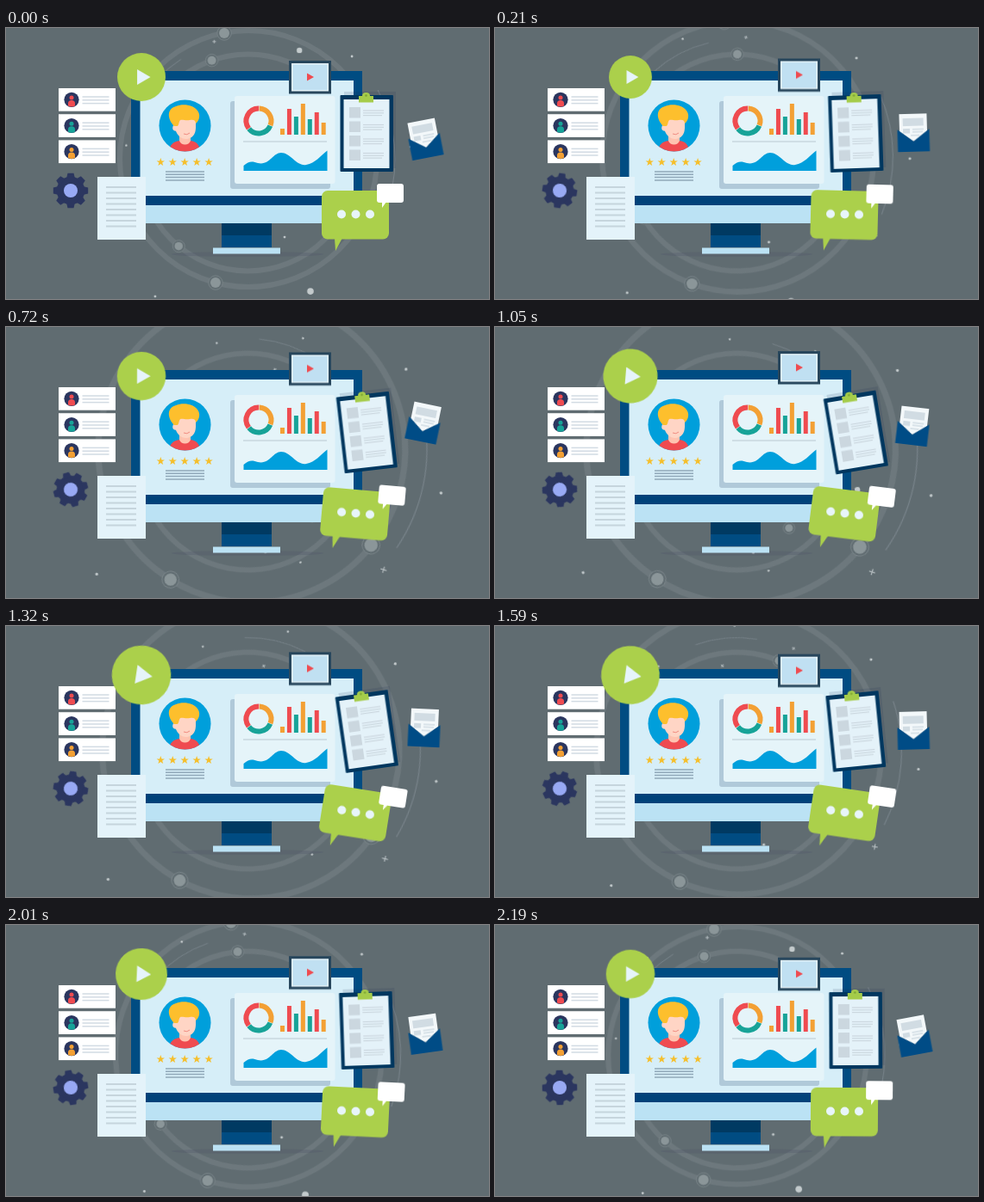
Recreate the animation shown at these times as an HTML page. Size 560x315 px, loop 2.22 s.

```html
<!DOCTYPE html>
<html lang="en">
<head>
<meta charset="utf-8">
<title>Dashboard</title>
<style>
html, body { margin: 0; width: 100%; height: 100%; overflow: hidden; background: #606c71; }
svg { display: block; width: 100vw; height: 100vh; }
</style>
</head>
<body>
<svg id="stage" viewBox="0 0 560 315">
  <g id="orbitOut"></g>
  <g id="orbitIn"></g>

  <ellipse cx="280" cy="263" rx="88" ry="3" fill="#4b5268" opacity=".25"/>

  <g id="monitor">
    <path fill="#004c82" d="M250 227h58v28h-58z"/>
    <path fill="#003a62" d="M250 227h58v14h-58z"/>
    <path fill="#bbe2f4" d="M240 255.500h78v7h-78z"/>
    <path fill="#bbe2f4" d="M145 206h268v21H145z"/>
    <path fill="#004c82" d="M145 50h268v156H145z"/>
    <path fill="#00427a" d="M145 195h268v11H145z"/>
    <path fill="#d6eef8" d="M155.500 61h247.500v134H155.500z"/>
  </g>

  <g id="profile">
    <clipPath id="disc"><circle cx="207.500" cy="113.500" r="30"/></clipPath>
    <circle cx="207.500" cy="113.500" r="30" fill="#009fdb"/>
    <g clip-path="url(#disc)">
      <path fill="#ef4b50" d="M189 145c0-9 5-13 12-14h13c7 1 11 5 11 14z"/>
      <path fill="#ffc3b0" d="M201 122h13v9c-2 6-11 6-13 0z"/>
      <path fill="#ffd5c5" d="M196 104h24v12c0 8-5 13-11 13s-10-4-12-9z"/>
      <circle cx="197" cy="116" r="3.800" fill="#ffd5c5"/>
      <path fill="#fdbf2d" d="M195 114c-8-8-9-20 2-23c9-4 21-1 25 5c4 5 2 12-2 15c0-4-3-5-7-4c-5 1-8-1-11 0c-2 2-1 5-3 7z"/>
      <path fill="none" stroke="#ef8b80" stroke-width="1" d="M206 123q4 2 7-1"/>
    </g>
  </g>
  <g id="stars" fill="#f5bf2c"></g>
  <g id="bio" stroke="#90a8b9" stroke-width="1.500"></g>

  <g id="charts">
    <rect x="260" y="85" width="116" height="102" rx="3" fill="#b0c9d9"/>
    <rect x="265" y="79" width="116.500" height="102" rx="3" fill="#e5f4f9"/>
    <g id="donut" fill="none" stroke-width="6"></g>
    <g id="bars"></g>
    <path stroke="#c8d7df" stroke-width="1.500" d="M275 132H372"/>
    <path fill="#009fdc" d="M275.500 166V160C282 154 286 155 292 157C306 160 309 145 319 145C330 145 337 161 348 159C359 157 364 149 372.500 142.500V166z"/>
  </g>

  <g id="cards"></g>
  <g id="sheet">
    <path fill="#e4f3fa" d="M106 173h56v73h-56z"/>
    <g id="sheetLines" stroke="#c6d5dd" stroke-width="1.800"></g>
  </g>

  <g id="gear" fill="#2b365f"></g>

  <g id="play">
    <circle cx="157" cy="57" r="28" fill="#abd04b"/>
    <path fill="#e6f4fa" d="M152 48L167.500 57L152 66z"/>
  </g>

  <g id="video">
    <path fill="#27465c" d="M328 38h49v38.500h-49z"/>
    <path fill="#e4f2f8" d="M331 41h43v32.500h-43z"/>
    <path fill="#c0e0f2" d="M332.500 42.500h40v29.500h-40z"/>
    <path fill="#ef4b50" d="M349 52.500L357 57L349 61.500z"/>
  </g>

  <g id="board">
    <path fill="#1c2b50" opacity=".13" d="M392 74h60v89h-60z"/>
    <rect x="387.500" y="78" width="61.500" height="89" rx="1" fill="#00375f"/>
    <path fill="#e4f2f9" d="M391.500 83h53v80h-53z"/>
    <g id="tasks"></g>
    <path fill="#a5cc4a" d="M409 79h4q0-4 4.500-4t4.500 4h4v7.500h-17z"/>
    <circle cx="417.500" cy="78.500" r="1.300" fill="#7fa633"/>
  </g>

  <g id="mail">
    <path fill="#f3f8fa" d="M-16-31H16V-11L0 1L-16-11z"/>
    <path fill="#d1dce3" d="M-12-26H12V-17H-12zM-12-14H-4V-8.500H-12z"/>
    <path stroke="#d1dce3" stroke-width="1.300" d="M-1-13H12M-1-10H11M-3-6H7"/>
    <path fill="#004c86" d="M-18.500-13L0 1L18.500-13V13H-18.500z"/>
  </g>

  <g id="chat">
    <rect x="366" y="189" width="78" height="56.500" rx="7" fill="#abd04b"/>
    <path fill="#abd04b" d="M381 244L382 259L390 244z"/>
    <g id="dots" fill="#e8f5fa"></g>
    <rect x="430" y="181" width="31" height="22" rx="3" fill="#fff"/>
    <path fill="#fff" d="M436 202V209L441 202z"/>
  </g>
</svg>

<script>
const LOOP = 2220;
const $ = id => document.getElementById(id);
const add = (id, markup) => $(id).insertAdjacentHTML('beforeend', markup);
const rect = (x, y, w, h, c) => `<rect x="${x}" y="${y}" width="${w}" height="${h}" fill="${c}"/>`;
const disc = (x, y, r, c) => `<circle cx="${x}" cy="${y}" r="${r}" fill="${c}"/>`;
const line = (x1, x2, y) => `<path d="M${x1} ${y}H${x2}"/>`;
const polar = (cx, cy, r, deg) => {
  const a = deg * Math.PI / 180;
  return [cx + r * Math.cos(a), cy + r * Math.sin(a)];
};
const arc = (cx, cy, r, from, to) =>
  `M${polar(cx, cy, r, from)}A${r} ${r} 0 ${to - from > 180 ? 1 : 0} 1 ${polar(cx, cy, r, to)}`;

// Orbits
const ring = (x, y, r) =>
  `<circle cx="${x}" cy="${y}" r="${r}" fill="none" stroke="#6d787d" stroke-width="6"/>`;
const node = (x, y, r) =>
  `<circle cx="${x}" cy="${y}" r="${r + 2.2}" fill="#606c71" stroke="#7c878b" stroke-width=".8"/>` +
  disc(x, y, r, '#8b9699');
const spark = (x, y, r = 1.4) => disc(x, y, r, '#c3cacc');
const cross = (x, y, s = 3) =>
  `<path stroke="#b4bcbf" stroke-width="1" d="M${x - s} ${y}h${2 * s}M${x} ${y - s}v${2 * s}"/>`;
const thin = d => `<path fill="none" stroke="#78838a" stroke-width="1" d="${d}"/>`;

add('orbitOut', ring(281, 152, 149) + thin(arc(281, 152, 170, -28, 17)) +
  node(253, 6, 6) + node(243, 296, 6) + node(419, 206.5, 6.5) +
  spark(353, 306, 3.8) + spark(401, 33) + spark(173, 312) + spark(323, 243) + spark(469, 138) +
  cross(437.7, 225.8));

const HUB = [280.5, 156.5];
const at = (make, r, deg, size) => make(...polar(...HUB, r, deg), size);
add('orbitIn', ring(...HUB, 126) + thin(arc(...HUB, 143, -152, -123)) +
  at(node, 126, -109.5, 5) + at(node, 126, 129.5, 4.8) + at(node, 98, -26.7, 4.5) +
  at(spark, 143.5, -65.5, 3.2) + at(spark, 142.5, -172, 1.2) + at(spark, 132, -4.8, 1.2) +
  at(spark, 157, -133.3, 1.2) + at(cross, 146, -105.6, 2) + at(cross, 111.5, -141, 2));

// Screen contents
for (let i = 0; i < 5; i++) {
  const pts = Array.from({ length: 10 }, (_, k) =>
    polar(179.3 + i * 13.95, 156, k % 2 ? 2 : 4.9, k * 36 - 90));
  add('stars', `<polygon points="${pts.join(' ')}"/>`);
}
[167, 170.3, 173.6, 176.9].forEach(y => add('bio', line(185, 230, y)));

const RED = '#ef4b50', TEAL = '#17a398', ORANGE = '#f3a034';
[[TEAL, 22, 142], [RED, 142, 272], [ORANGE, 272, 382]].forEach(([c, a, b]) =>
  add('donut', `<path stroke="${c}" d="${arc(293, 108, 14.5, a + 1, b - 1)}"/>`));
[[7, ORANGE], [30, RED], [21, TEAL], [36, ORANGE], [18, TEAL], [26, RED], [14, ORANGE]].forEach(([h, c], i) =>
  add('bars', rect(318 + i * 7.95, 124 - h, 5, h, c)));

// Side panels
[RED, TEAL, ORANGE].forEach((c, i) => {
  const y = 70 + i * 30.2;
  add('cards', rect(61, y, 66, 26.7, '#fff') + disc(76, y + 13.3, 8.6, '#2b365f') +
    disc(76, y + 11, 2.5, c) +
    `<path fill="${c}" d="M72 ${y + 20.5}v-3q0-3.500 4-3.500t4 3.500v3q-4 2-8 0z"/>` +
    `<g stroke="#d2dbe3" stroke-width="1.500">${[10, 13.8, 17.6].map(d => line(88.5, 119.5, y + d)).join('')}</g>`);
});
for (let i = 0; i < 8; i++) add('sheetLines', line(116, 151, 185 + i * 6.5));
for (let i = 0; i < 4; i++) {
  const y = 92 + i * 16.5;
  add('tasks', rect(398, y, 13, 12.5, '#cbd7df') +
    `<g stroke="#cbd7df" stroke-width="1.200">${[4, 6.8, 9.6].map((d, k) => line(414, k == 2 ? 436 : 438, y + d)).join('')}</g>`);
}
[389, 405.5, 422].forEach(x => add('dots', disc(x, 216.5, 5)));

add('gear', disc(75, 189, 16.3));
for (let i = 0; i < 8; i++)
  add('gear', `<path d="M70 175L71.500 168.800H78.500L80 175z" transform="rotate(${i * 45} 75 189)"/>`);
add('gear', disc(75, 189, 8, '#98a9f4'));

// Motion: id, pivot, [time, transform] steps
const spin = (deg, scale = 1) => `rotate(${deg}deg) scale(${scale})`;
const lift = y => `translate(0px, ${y}px)`;
const mail = (x, y, deg) => `translate(${x}px, ${y}px) rotate(${deg}deg)`;
const swing = (t, rest, far) => [[0, rest], [t, far], [LOOP, rest]];

const moves = [
  ['orbitOut', [300, 170.6], swing(870, spin(0), spin(20.7, 1.235))],
  ['orbitIn', HUB, swing(930, spin(0), spin(86.8))],
  ['play', [157, 57], [[0, spin(0)], [350, spin(0, .82)], [700, spin(0)], [1430, spin(10, 1.265)], [LOOP, spin(0)]]],
  ['video', [0, 0], swing(925, lift(0), lift(-11))],
  ['board', [418, 122], swing(1110, spin(0), spin(-10))],
  ['chat', [405, 217], swing(1470, spin(0), spin(10))],
  ['mail', [0, 0], swing(570, mail(487, 138, -11), mail(482.5, 118.5, 14))],
  ['gear', [75, 189], [[0, spin(0)], [LOOP, spin(90)]]]
];
for (const [id, [x, y], steps] of moves) {
  const el = $(id);
  el.style.transformOrigin = `${x}px ${y}px`;
  el.animate(steps.map(([t, transform]) => ({ offset: t / LOOP, transform })),
    { duration: LOOP, iterations: Infinity });
}
</script>
</body>
</html>
```
